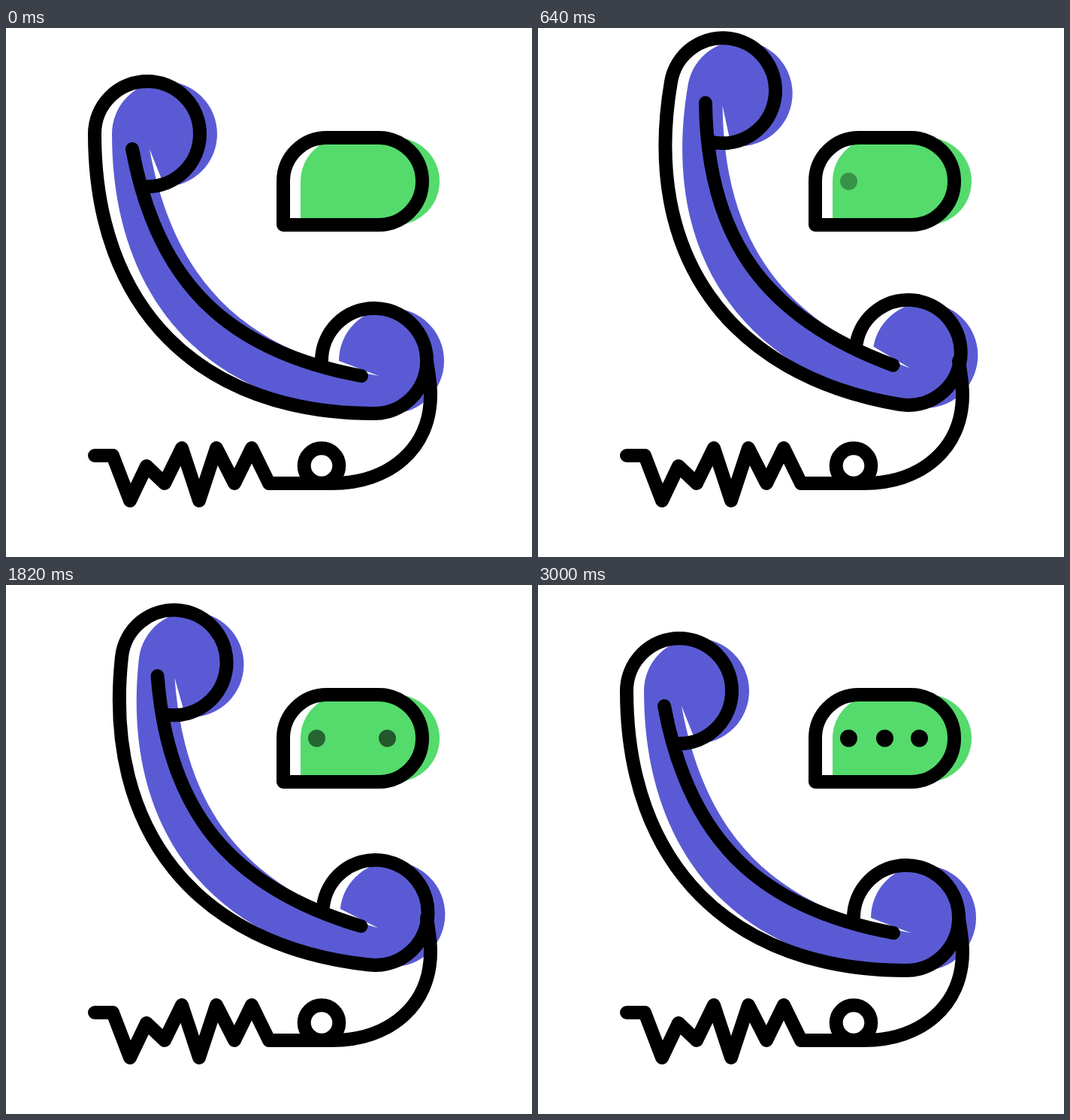
These frames come from a looping animation (700x704 px, 3020 ms). An HTML page:

```html
<!DOCTYPE html>
<html>
<head>
<meta charset="utf-8">
<style>
  html, body { margin: 0; width: 100%; height: 100%; overflow: hidden; background: #fff; }
  svg { display: block; width: 700px; height: 704px; }
  .line { fill: none; stroke: #000; stroke-width: 18; stroke-linecap: round; stroke-linejoin: round; }
</style>
</head>
<body>
<svg viewBox="0 0 700 704">
  <g id="handset">
    <path fill="#5a5bd4" transform="translate(23)" d="M188 211A70 70 0 1 0 118 141C118 373 258 513 490 513A70 70 0 1 0 420 443L473 463C295 430 201 339 168 161Z"/>
    <path class="line" d="M188 211A70 70 0 1 0 118 141C118 373 258 513 490 513A70 70 0 1 0 420 443"/>
    <path class="line" d="M168 161C201 339 295 430 473 463"/>
  </g>
  <path class="line" d="M118 569H142L165 629L187 583L211 606L234 559L257 629L280 559L304 606L327 559L350 606H434C510 606 565 560 565 488C565 472 562 458 560 443"/>
  <circle class="line" cx="420" cy="582.5" r="23.3"/>
  <g id="bubble">
    <path fill="#54db6c" transform="translate(23)" d="M369 262H496A58 58 0 0 0 496 146H427A58 58 0 0 0 369 204Z"/>
    <path class="line" d="M369 262H496A58 58 0 0 0 496 146H427A58 58 0 0 0 369 204Z"/>
    <circle class="dot" cx="413.5" cy="204" r="11.5"/>
    <circle class="dot" cx="461.5" cy="204" r="11.5"/>
    <circle class="dot" cx="507.5" cy="204" r="11.5"/>
  </g>
</svg>
<script>
const LOOP = 3020, STEP = 20;
const handset = document.getElementById('handset');
const bubble = document.getElementById('bubble');
const dots = document.querySelectorAll('.dot');

// Progress from 0 to 1 between two times: soft start, long settling.
function ease(t, from, to) {
  const x = Math.min(Math.max((t - from) / (to - from), 0), 1);
  return 1 - (1 - x) ** 3 * (1 + 3 * x);
}

// Two and a half cosine blinks, ending visible.
function blink(t, start) {
  const cycles = Math.min(Math.max((t - start) / 570, 0), 2.5);
  return (1 - Math.cos(2 * Math.PI * cycles)) / 2;
}

function draw(now) {
  const t = Math.floor(now % LOOP / STEP) * STEP;

  // Wind up, swing over, relax, return to rest.
  const windUp = ease(t, 0, 310);
  const swing = -13.8 * windUp + 29.1 * ease(t, 310, 870)
    - 9.3 * ease(t, 870, 2010) - 6 * ease(t, 2180, 3000);
  handset.setAttribute('transform', `rotate(${swing} 556.5 453.3)`);

  // The bubble shrinks into its corner during the wind-up and pops back.
  const hidden = windUp - ease(t, 310, 620);
  bubble.setAttribute('transform',
    `translate(371 262) rotate(${-17.5 * hidden}) scale(${1 - hidden}) translate(-371 -262)`);

  dots.forEach((dot, i) => dot.setAttribute('opacity', blink(t, 530 + 155 * i)));
}

let start;
function tick(now) {
  start ??= now;
  draw(now - start);
  requestAnimationFrame(tick);
}
draw(0);
requestAnimationFrame(tick);
</script>
</body>
</html>
```
